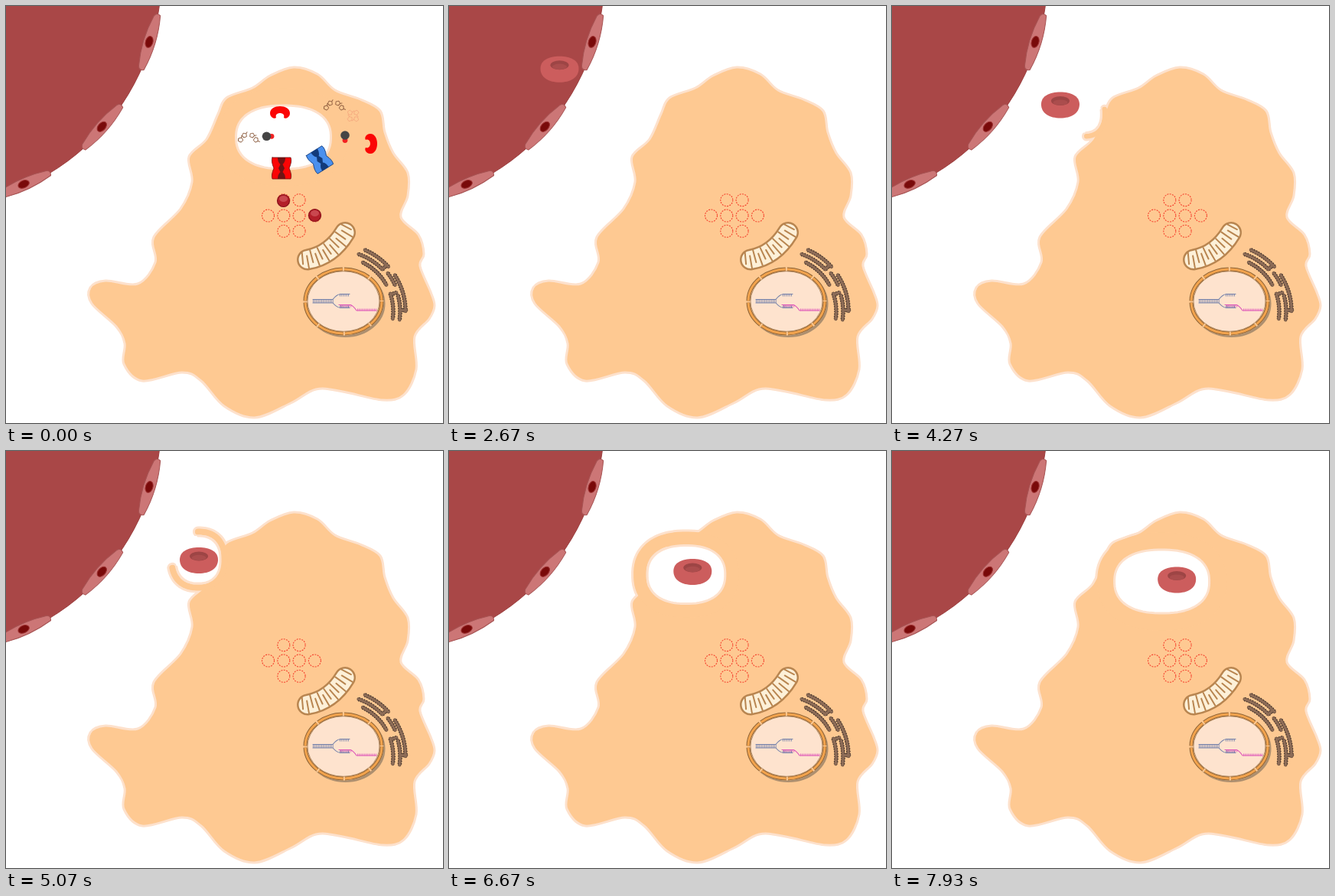
These frames come from a looping animation (571 by 545 pixels, 8000 ms). An HTML page with a canvas:

```html
<!DOCTYPE html>
<html>
<head>
<meta charset="utf-8">
<style>
html, body { margin: 0; width: 100%; height: 100%; overflow: hidden; background: #fff; }
canvas { display: block; }
</style>
</head>
<body>
<canvas id="stage" width="571" height="545"></canvas>
<script>
const ctx = document.getElementById('stage').getContext('2d');
const LOOP = 8000, RESET = 1200, REACH = 4000, GRIP = 5070, SEAL = 5650;
const CELL = '#fec992', MEMBRANE = '#fde1cc';
const rad = deg => deg * Math.PI / 180;

// Lobes and valleys of the cell, clockwise from the top
const outline = [
  [376, 80], [407, 89], [430, 110], [463, 122], [489, 137], [495, 165], [506, 192], [525, 218], [525, 248], [516, 276],
  [539, 299], [546, 324], [541, 340], [555, 374], [560, 392], [553, 409], [534, 432], [536, 475], [520, 508], [492, 515],
  [440, 504], [405, 501], [372, 519], [325, 538], [285, 523], [255, 490], [230, 479], [178, 490], [154, 468], [155, 441],
  [144, 419], [112, 389], [110, 368], [130, 359], [172, 363], [195, 335], [193, 302], [228, 265], [243, 230], [239, 197],
  [262, 174], [277, 141], [288, 120], [322, 107], [345, 91]];

// Time, then x, y of the red cell
const redCellKeys = [[1200, 105, 37], [1870, 112, 48], [2930, 155, 94], [3400, 185, 115],
  [5070, 252, 143], [6000, 284, 151], [7330, 352, 165], [8000, 374.5, 169]];
// Time, then x, y, radii and rim width of the engulfing pocket
const pocketKeys = [[REACH, 251, 141, 20, 22, 9], [GRIP, 251, 142, 29, 31, 11], [6000, 283.5, 155, 39.5, 35, 14],
  [7330, 336, 168, 62, 41, 25], [7930, 352.5, 170.5, 62, 41.5, 24], [LOOP, 362.5, 171.5, 62, 41.5, 24]];

const mix = (a, b, k) => a.map((v, i) => v + (b[i] - v) * k);
const ramp = (t, from, to) => Math.min(1, Math.max(0, (t - from) / (to - from)));

function track(keys, t) {
  const i = Math.max(1, keys.findIndex(k => k[0] >= t));
  const [t0, ...a] = keys[i - 1], [t1, ...b] = keys[i];
  return mix(a, b, ramp(t, t0, t1));
}

function paint(path, fill, stroke, width = 1) {
  if (fill) { ctx.fillStyle = fill; ctx.fill(path); }
  if (stroke) { ctx.strokeStyle = stroke; ctx.lineWidth = width; ctx.stroke(path); }
}
function oval(x, y, rx, ry, fill, stroke, width) {
  const p = new Path2D();
  p.ellipse(x, y, rx, ry, 0, 0, 2 * Math.PI);
  paint(p, fill, stroke, width);
}
const shape = (d, fill, stroke, width) => paint(new Path2D(d), fill, stroke, width);
function at(x, y, deg, draw) {
  ctx.save();
  ctx.translate(x, y);
  ctx.rotate(rad(deg));
  draw();
  ctx.restore();
}
function dashed(pattern, draw) {
  ctx.save();
  ctx.lineCap = 'butt';
  ctx.setLineDash(pattern);
  draw();
  ctx.restore();
}

// Closed Catmull-Rom curve
function smooth(points) {
  const n = points.length, path = new Path2D(), p = i => points[(i + n) % n];
  path.moveTo(...p(0));
  for (let i = 0; i < n; i++) {
    const out = p(i).map((v, j) => v + (p(i + 1)[j] - p(i - 1)[j]) / 6);
    const into = p(i + 1).map((v, j) => v - (p(i + 2)[j] - p(i)[j]) / 6);
    path.bezierCurveTo(...out, ...into, ...p(i + 1));
  }
  return path;
}
const cellPath = smooth(outline);

// Squarish ring, open towards the upper left unless half is 180
function ring(x, y, rx, ry, half) {
  const path = new Path2D(), soft = v => Math.sign(v) * Math.abs(v) ** 0.85;
  for (let i = -40; i <= 40; i++) {
    const a = rad(38 + half * i / 40);
    path.lineTo(x + rx * soft(Math.cos(a)), y + ry * soft(Math.sin(a)));
  }
  return path;
}

function cell(t) {
  if (t < REACH) return paint(cellPath, CELL, MEMBRANE, 3);
  const [x, y, rx, ry, rim] = track(pocketKeys, t);
  const half = 20 + 108 * ramp(t, REACH, GRIP) + 52 * ramp(t, GRIP, SEAL);
  const arms = ring(x, y, rx + rim / 2, ry + rim / 2, half);
  paint(arms, null, MEMBRANE, rim + 3);
  paint(cellPath, CELL, MEMBRANE, 3);
  paint(arms, null, CELL, rim - 3);
  paint(ring(x, y, rx, ry, 180), '#fff');
  paint(ring(x, y, rx, ry, half), null, MEMBRANE, 3);
}

function vessel() {
  oval(-99, -40, 302, 302, '#a94747', '#9c3f3f', 1);
  for (let i = 0; i < 3; i++) {
    at(-99, -40, 16.9 + 24.5 * i, () => {
      ctx.translate(299, 0);
      shape('M4-37Q12 0 4 37Q-2 40-4 34Q-11 0-4-34Q-2-40 4-37Z', '#cc7676', '#a65252');
      oval(0, 0, 4.8, 7.6, '#790a0a', '#9c3030', 1);
    });
  }
}

function redCell(x, y) {
  at(x, y, 0, () => {
    shape('M-25-1C-25-12-14-17 0-17S25-12 25-1C25 11 14 17 0 17S-25 11-25-1Z', '#cc5d5d');
    oval(0, -5.5, 12, 6, '#9d4545');
    oval(0, -3.5, 9.5, 3.7, '#ab4d4d');
  });
}

function mitochondrion() {
  const from = [394, 331.5], bend = [425, 326], to = [443, 296];
  const spine = `M${from}Q${bend} ${to}`, brown = '#b88550';
  shape(spine, null, brown, 28);
  shape(spine, null, '#fdf0d8', 23);
  for (let i = 0; i < 13; i++) {
    const t = i / 10 - 0.1, side = i % 2 ? 1 : -1;
    const a = mix(from, bend, t), b = mix(bend, to, t);
    const turn = Math.atan2(b[1] - a[1], b[0] - a[0]) * 180 / Math.PI;
    at(...mix(a, b, t), turn, () => shape(`M0 ${11 * side}V${-5 * side}`, null, brown, 2));
  }
}

function reticulum() {
  const path = new Path2D();
  for (const [r, from, to] of [[87, -67, -42], [79, -71, -44], [71, -64, -29], [87, -33, 0], [81, -38, -25], [80, -15, 8], [71, -19, 8]]) {
    path.moveTo(435 + r * Math.cos(rad(from)), 399 + r * Math.sin(rad(from)));
    path.arc(435, 399, r, rad(from), rad(to));
  }
  for (const [r, a] of [[79, -44], [80, -1], [71, -18]]) {
    path.moveTo(435 + r * Math.cos(rad(a)), 399 + r * Math.sin(rad(a)));
    path.lineTo(435 + (r + 8) * Math.cos(rad(a)), 399 + (r + 8) * Math.sin(rad(a)));
  }
  paint(path, null, '#705442', 4.6);
  dashed([1.5, 1.8], () => paint(path, null, '#43332a', 5.6));
  paint(path, null, '#8d6c57', 3.2);
}

function nucleus() {
  oval(443.5, 389, 50, 42, null, '#ad8f6f', 4);
  oval(441, 386, 50, 42, '#fee3ce', CELL, 5);
  dashed([34, 2.3], () => {
    oval(441, 386, 50, 42, null, '#8c6236', 5);
    oval(441, 386, 50, 42, null, '#f2a34d', 3);
  });
  oval(441, 386, 47, 39.3, null, '#a5794c', 0.8);
  const blue = '#7582ab', pink = '#e05bb9';
  const rungs = (d, color, height) => dashed([0.9, 1.3], () => shape(d, null, color, height));
  shape('M401 383.5H427Q432 377 437 376.5H449M401 388H427Q432 394 437 394.5H449', null, blue, 1.1);
  shape('M435 390.5H450Q454 392 458 398H484', null, pink, 1.2);
  rungs('M401 385.7H428', blue, 4.5);
  rungs('M436 378H449M436 393H449', blue, 3);
  rungs('M437 392H452M459 397H484', pink, 3);
}

// Hexagonal cluster of store places
function ferritin() {
  dashed([2, 1.4], () => {
    for (let row = -1; row <= 1; row++)
      for (let col = row ? 1 : 0; col < (row ? 3 : 4); col++)
        oval(342.5 + 20.3 * col, 274 + 20.3 * row, 8, 8, null, '#f5422e', 1.1);
  });
}

function iron(x, y) {
  oval(x, y, 8, 8, '#b31f29', '#86121b', 1.2);
  oval(x, y - 2.5, 5.5, 4, '#c9484f');
}

function transporter(fill, core) {
  shape('M-12-14H12Q14-9 10 0Q14 9 12 14H-12Q-14 9-10 0Q-14-9-12-14Z', fill, core, 0.8);
  shape('M-5-14H5Q5-8 1.5-5L4 0L1.5 5Q5 8 5 14H-5Q-5 8-1.5 5L-4 0L-1.5-5Q-5-8-5-14Z', core);
}

const enzyme = () => shape('M-13 0C-13-12 13-12 13 0C13 6 7 8 5 6C8-2-8-2-5 6C-7 8-13 6-13 0Z', '#fb0505');

function monoxide() {
  oval(6.5, 0, 3.4, 3.4, '#f22222');
  oval(0, 0, 5.8, 5.8, '#454545');
}

const pyrrole = (x, y, deg, color) =>
  at(x, y, deg, () => shape('M0-3.2L3-1L1.9 2.6H-1.9L-3-1ZM3-1L5-2.4', null, color, 0.9));
function pigment() {
  for (const x of [-10, -5, 5, 10]) pyrrole(x, Math.abs(x) * 1.2 - 9, x * 5, '#8a5a3c');
}
function haem() {
  for (let i = 0; i < 4; i++) at(0, 0, 90 * i, () => pyrrole(-4, -4, 0, '#ef9473'));
}

function breakdown(t) {
  at(360, 212, 0, () => transporter('#fb0505', '#6d1414'));
  at(410, 201, -32, () => transporter('#4a90ee', '#123a7a'));
  iron(362.5, 254.5);
  iron(403.5, 273.5);
  const left = 1 - ramp(t, 0, 870);
  ctx.globalAlpha = left;
  at(358, 140, 0, enzyme);
  at(476, 180, 90, enzyme);
  at(340.5, 170.3, 0, monoxide);
  at(443, 169, 90, monoxide);
  at(316.5, 172, 0, pigment);
  at(428.5, 130, 0, pigment);
  ctx.globalAlpha = left * 0.6;
  at(453.5, 143.5, 0, haem);
}

function draw(t) {
  ctx.globalAlpha = 1;
  ctx.fillStyle = '#fff';
  ctx.fillRect(0, 0, 571, 545);
  ctx.lineCap = ctx.lineJoin = 'round';
  vessel();
  cell(t < RESET ? LOOP : t);
  mitochondrion();
  reticulum();
  nucleus();
  ferritin();
  if (t < RESET) return breakdown(t);
  ctx.globalAlpha = ramp(t, RESET, RESET + 300);
  redCell(...track(redCellKeys, t));
}

const start = performance.now();
function tick() {
  draw((performance.now() - start) % LOOP);
  requestAnimationFrame(tick);
}
tick();
</script>
</body>
</html>
```
